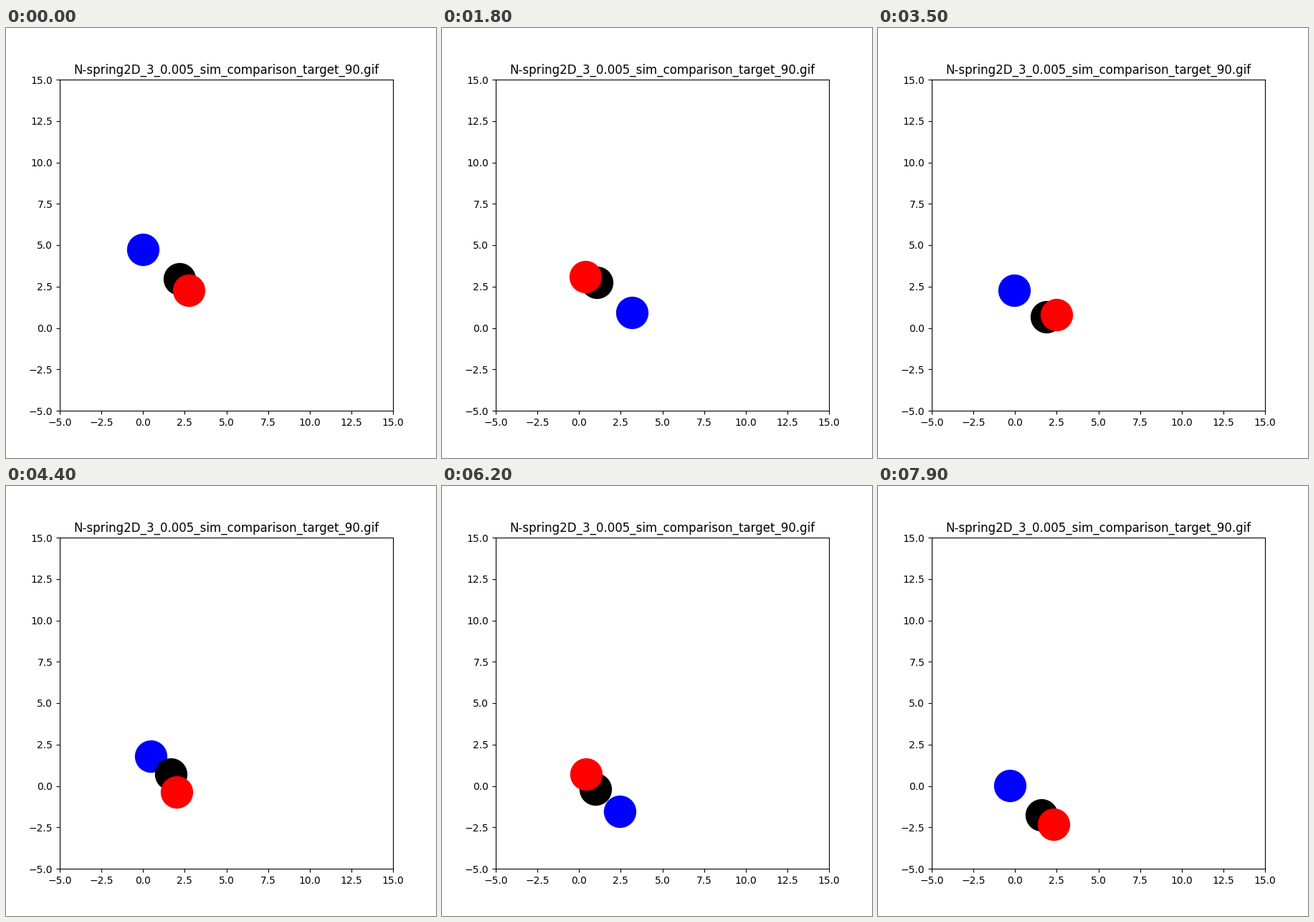
Recreate the animation shown at these times as a matplotlib script. Size 600 px wide and 600 px high, loop 8000 ms.

```python
import numpy as np
import matplotlib.pyplot as plt
from matplotlib.animation import FuncAnimation

FRAMES, INTERVAL, SUBSTEPS = 80, 100, 2
COLORS = "blue", "black", "red"

# A few key poses in pixels, x and y for each ball
POSES = {
    0: (191, 309, 242, 350, 255, 366),
    9: (224, 341, 232, 347, 229, 373),
    27: (235.5, 396, 221.5, 383, 220, 357),
    55: (260, 444, 211, 402.5, 195, 404),
    79: (183.5, 418, 227.5, 458.5, 244.5, 472),
}
SPEED = -0.2, 0.2, 0.3, 1.0, -0.4, 3.0  # rough start velocity

TIMES = list(POSES)
KEYS = np.array(list(POSES.values()))


def simulate(p):
    """Three equal masses joined by springs, one row of parameters per run.

    Columns: start position (6), velocity (6), stiffness (3), rest length.
    """
    q = p[:, :6].reshape(-1, 3, 2)
    v = p[:, 6:12].reshape(-1, 3, 2)
    k = p[:, 12:15, None] * 0.01
    rest = p[:, 15, None, None] * 10

    def accel(q):
        d = np.roll(q, -1, axis=1) - q
        r = np.sqrt((d * d).sum(-1, keepdims=True)) + 1e-6
        f = k * (1 - rest / r) * d
        return f - np.roll(f, 1, axis=1)

    h = 1 / SUBSTEPS
    out = np.empty((len(p), FRAMES, 6))
    out[:, 0] = p[:, :6]
    a = accel(q)
    for i in range(1, FRAMES):
        for _ in range(SUBSTEPS):
            v = v + a * (h / 2)
            q = q + v * h
            a = accel(q)
            v = v + a * (h / 2)
        out[:, i] = q.reshape(-1, 6)
    return out


def residuals(p):
    """Pixel errors at the key poses, plus a pull towards equal springs."""
    miss = (simulate(p)[:, TIMES] - KEYS).reshape(len(p), -1)
    k = p[:, 12:15]
    return np.hstack([miss, 5 * (k - k.mean(1, keepdims=True))])


def cost(r):
    return (r * r).sum(1)


def fit(starts=10, tries=2000, rounds=40):
    """Levenberg-Marquardt from the best of many seeded guesses."""
    rng = np.random.default_rng(4)
    p = np.hstack([
        np.tile(KEYS[0], (tries, 1)),
        SPEED + rng.normal(0, 0.35, (tries, 6)),
        rng.uniform(0.85, 1.4, (tries, 1)) + rng.normal(0, 0.05, (tries, 3)),
        rng.uniform(0, 2, (tries, 1)),
    ])
    p = p[np.argsort(cost(residuals(p)))[:starts]]
    r = residuals(p)
    n, eps = p.shape[1], 1e-5
    eye = np.eye(n)
    damp = np.full(starts, 0.05)
    for _ in range(rounds):
        moved = (p[:, None] + eps * eye).reshape(-1, n)
        jac = (residuals(moved).reshape(starts, n, -1) - r[:, None]) / eps
        hess = jac @ jac.transpose(0, 2, 1)
        hess = hess + hess * eye * damp[:, None, None] + 1e-8 * eye
        trial = p - np.linalg.solve(hess, jac @ r[..., None])[..., 0]
        r_new = residuals(trial)
        better = cost(r_new) < cost(r)
        p = np.where(better[:, None], trial, p)
        r = np.where(better[:, None], r_new, r)
        damp = np.clip(damp * np.where(better, 0.3, 4), 1e-9, 1e6)
    return p[[np.argmin(cost(r))]]


def trajectory():
    path = simulate(fit())[0]
    error = KEYS - path[TIMES]
    for c in range(6):
        path[:, c] += np.interp(np.arange(FRAMES), TIMES, error[:, c])
    return path.reshape(FRAMES, 3, 2)


fig, ax = plt.subplots(figsize=(6, 6), dpi=100)
ax.set(xlim=(-5, 15), ylim=(-5, 15))
ax.set_title("N-spring2D_3_0.005_sim_comparison_target_90.gif")
balls = [ax.plot([], [], "o", color=c, ms=31.6, mew=1)[0] for c in COLORS]

# Pixels to axis units: the axes span 465 by 462 pixels from (75, 534)
path = (trajectory() - (75, 534)) * 20 / (465, -462) - 5


def update(i):
    for ball, (x, y) in zip(balls, path[i]):
        ball.set_data([x], [y])
    return balls


anim = FuncAnimation(fig, update, frames=FRAMES, interval=INTERVAL,
                     repeat=True, repeat_delay=0)
plt.show()
```
